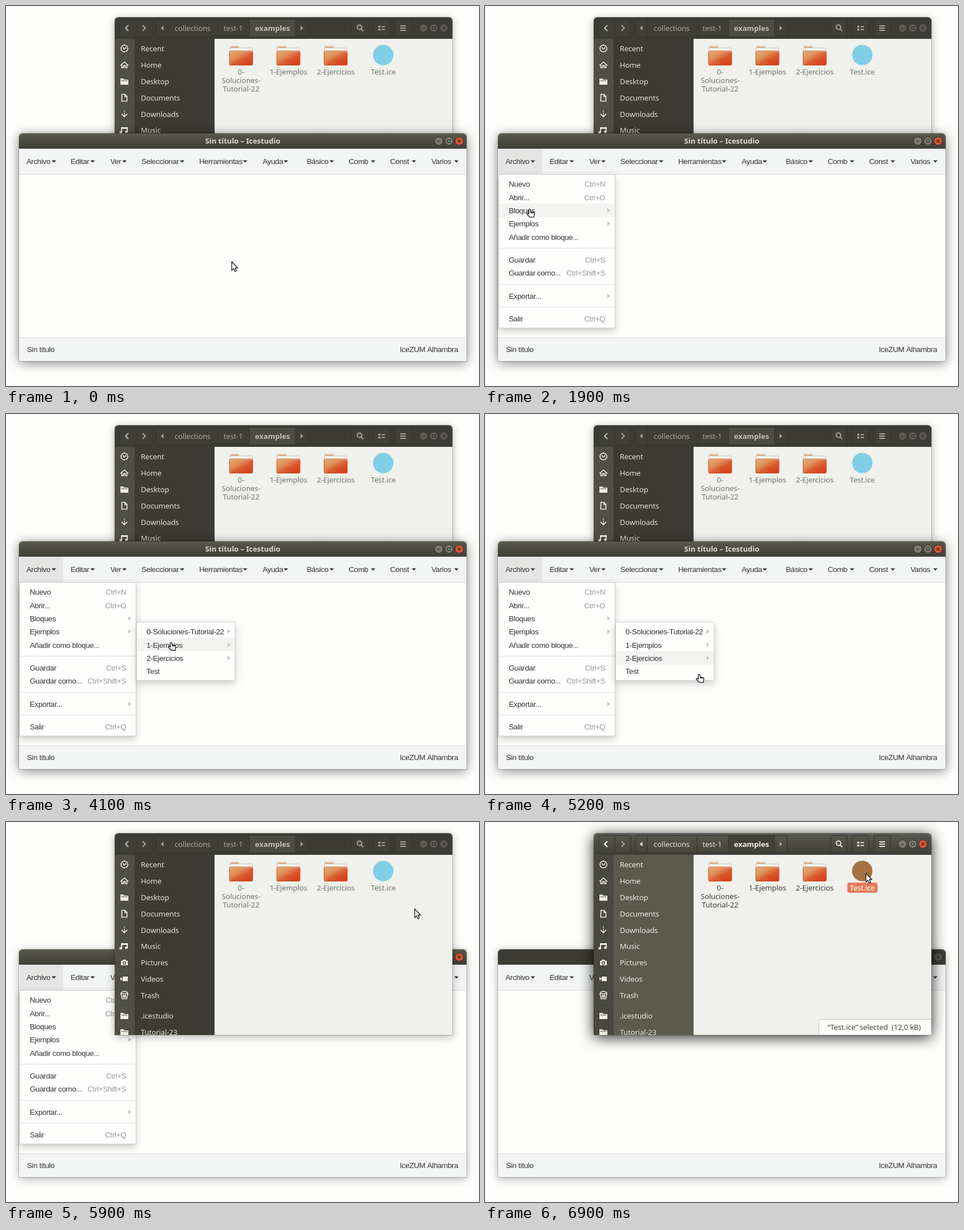
These frames come from a looping animation (835 by 671 pixels, 8 s). An HTML page with a canvas:

```html
<!DOCTYPE html>
<html lang="es">
<head>
<meta charset="utf-8">
<style>
html, body { margin: 0; width: 100%; height: 100%; overflow: hidden; background: #fefefc; }
canvas { display: block; }
</style>
</head>
<body>
<canvas id="stage" width="835" height="671"></canvas>
<script>
const ctx = document.getElementById('stage').getContext('2d');
const LOOP = 8000, STEP = 100;
const AT = { menu: 1200, sub: 2300, leave: 5300, subClosed: 5400, raise: 5900, focus: 6000, menuClosed: 6300, select: 6600 };

// Pointer stops: time, left, top
const track = [
  [0, 398, 451], [300, 398, 451], [1100, 56, 270], [1200, 54, 277], [1500, 54, 277],
  [1900, 73, 358], [2100, 83, 384], [2500, 83, 384], [2600, 93, 384], [2800, 93, 384],
  [2900, 95, 384], [3000, 95, 384], [3100, 113, 384], [3500, 113, 384], [4000, 270, 392],
  [4400, 369, 459], [4500, 372, 459], [5200, 372, 459], [5600, 721, 175], [5700, 721, 175],
  [5800, 721, 153], [6200, 721, 153], [6300, 684, 106], [6400, 684, 106], [6900, 672, 90], [LOOP, 672, 90]
];

const UI = '"Noto Sans", sans-serif', WEB = '"Liberation Sans", Arial, sans-serif';
const fonts = {
  ui: ['13px ' + UI, '-0.1px'],
  bold: ['bold 13px ' + UI, '0px'],
  web: ['13.5px ' + WEB, '-0.4px']
};

function text(str, x, y, color, font = 'ui', align = 'left') {
  [ctx.font, ctx.letterSpacing] = fonts[font];
  ctx.textAlign = align;
  ctx.fillStyle = color;
  ctx.fillText(str, x, y + 5);
}

function box(x, y, w, h, fill, radius = 0, stroke) {
  ctx.beginPath();
  ctx.roundRect(x, y, w, h, radius);
  if (fill) { ctx.fillStyle = fill; ctx.fill(); }
  if (stroke) { ctx.strokeStyle = stroke; ctx.lineWidth = 1; ctx.stroke(); }
}

function disc(x, y, r, fill, stroke) {
  ctx.beginPath();
  ctx.arc(x, y, r, 0, 7);
  ctx.fillStyle = fill;
  ctx.fill();
  if (stroke) { ctx.strokeStyle = stroke; ctx.lineWidth = 1; ctx.stroke(); }
}

function shape(d, x, y, fill, stroke, width = 1.6) {
  const path = new Path2D(d);
  ctx.save();
  ctx.translate(x, y);
  if (fill) { ctx.fillStyle = fill; ctx.fill(path, 'evenodd'); }
  if (stroke) { ctx.strokeStyle = stroke; ctx.lineWidth = width; ctx.stroke(path); }
  ctx.restore();
}

function gradient(x0, y0, x1, y1, ...colors) {
  const g = ctx.createLinearGradient(x0, y0, x1, y1);
  colors.forEach((c, i) => g.addColorStop(i / (colors.length - 1), c));
  return g;
}

function shadowed(alpha, blur, dy, draw) {
  ctx.save();
  ctx.shadowColor = `rgba(0,0,0,${alpha})`;
  ctx.shadowBlur = blur;
  ctx.shadowOffsetY = dy;
  draw();
  ctx.restore();
}

function windowBase(x, y, w, h, fill, alpha, blur, dy) {
  shadowed(alpha, blur, dy, () => box(x, y, w, h, fill, [6, 6, 0, 0]));
  box(x - .5, y - .5, w + 1, h + 1, null, [6, 6, 0, 0], 'rgba(0,0,0,.2)');
}

function titleBar(x, y, w, h, active) {
  box(x, y, w, h, active ? gradient(0, y, 0, y + h, '#5a594e', '#3e3d37') : '#3c3b35', [6, 6, 0, 0]);
}

function windowButtons(x, y, active) {
  const marks = ['M-3 .5H3', 'M-2.5-2.5h5v5h-5z', 'M-2.5-2.5l5 5M2.5-2.5l-5 5'];
  marks.forEach((mark, i) => {
    const close = active && i === 2;
    disc(x + 18 * i, y, 7.3, close ? '#e0572d' : active ? '#7d7c72' : '#5b5a53', '#302f2b');
    shape(mark, x + 18 * i, y, null, close ? '#4a1c0e' : '#34332e', 1.2);
  });
}

const topMenus = [
  ['Archivo', 36, 84.5], ['Editar', 114, 153], ['Ver', 184, 209], ['Seleccionar', 239, 311],
  ['Herramientas', 341, 422], ['Ayuda', 453, 494], ['Básico', 531, 575], ['Comb', 605, 648],
  ['Const', 678, 720], ['Varios', 751, 795]
];

const SUB = '>';
const fileMenu = [
  ['Nuevo', 314, 'Ctrl+N'], ['Abrir...', 337.5, 'Ctrl+O'], ['Bloques', 361, SUB], ['Ejemplos', 384, SUB],
  ['Añadir como bloque...', 407.5, ''], ['Guardar', 448, 'Ctrl+S'], ['Guardar como...', 471, 'Ctrl+Shift+S'],
  ['Exportar...', 512, SUB], ['Salir', 552, 'Ctrl+Q']
];
const examples = [
  ['0-Soluciones-Tutorial-22', 384, SUB], ['1-Ejemplos', 407.5, SUB], ['2-Ejercicios', 431, SUB], ['Test', 454, '']
];

function menu(items, x, y, w, h, hoverY) {
  shadowed(.2, 12, 5, () => box(x, y, w, h, '#fefefd'));
  box(x + .5, y + .5, w - 1, h - 1, null, 0, '#cfcfcc');
  for (const [label, cy, extra] of items) {
    if (Math.abs(hoverY - cy) <= 11.8) box(x + 1, cy - 12, w - 2, 23.5, '#f3f4f2');
    text(label, x + 18, cy, '#333', 'web');
    if (extra === SUB) shape('M0-4L5 0L0 4z', x + w - 14, cy, '#c8c8c6');
    else text(extra, x + w - 18, cy, '#999', 'web', 'right');
  }
}

function editor(t, pointer) {
  const active = t < AT.focus;
  const open = t >= AT.menu && t < AT.menuClosed;
  windowBase(23, 225, 790, 402, '#fefffc', ...(t < AT.raise ? [.5, 20, 3] : [.3, 15, 3]));
  titleBar(23, 225, 790, 27, active);
  text('Sin título – Icestudio', 418, 238, '#dfdbd2', 'bold', 'center');
  windowButtons(764, 238.5, active);

  box(23, 252, 790, 45, '#f3f5f4');
  if (open) box(24, 252, 77, 45, '#e5e6e4');
  box(23, 297, 790, 1, '#d9dbd9');
  for (const [label, x, caret] of topMenus) {
    text(label, x, 274, '#333', 'web');
    shape('M-4-1.5h8l-4 4z', caret, 274, '#333');
  }
  box(23, 585, 790, 42, '#f3f5f4');
  box(23, 585, 790, 1, '#d9dbd9');
  text('Sin título', 37, 606, '#333', 'web');
  text('IceZUM Alhambra', 798, 606, '#333', 'web', 'right');

  const hovering = t < AT.leave;
  const inSub = pointer.x > 224;
  if (open) {
    menu(fileMenu, 24, 297, 206, 272, hovering && !inSub ? pointer.y + 1 : 0);
    for (const y of [427, 491, 531]) box(25, y, 204, 1, '#e2e3e1');
  }
  if (t >= AT.sub && t < AT.subClosed)
    menu(examples, 230, 367, 175, 104, hovering && inSub ? Math.min(pointer.y + 1, 431) : 0);
}

const FOLDER = 'M-7-5h5l2 2h7v9H-7zM-5.5-1.5v1h11v-1z';
const places = [
  ['Recent', 75, null, 'M6 0A6 6 0 1 1-6 0A6 6 0 1 1 6 0M-3-2L0 1L3-2'],
  ['Home', 104, null, 'M-7 1L0-5L7 1M-4.5 0v5h3V1h3v4h3V0'],
  ['Desktop', 133, FOLDER],
  ['Documents', 162, null, 'M-4.5-6H1L4.5-2.5V6h-9zM1-6v4h3.5'],
  ['Downloads', 190.5, null, 'M0-6v2M0-2v2M0 1v4M-5 0L0 5L5 0'],
  ['Music', 219, 'M-6-5H6V3A2.5 2 0 1 1 4 1V-2H-4V4A2.5 2 0 1 1-6 2z'],
  ['Pictures', 248, 'M-6-3h3l1-2h4l1 2h3v8H-6zM3 1A3 3 0 1 0-3 1A3 3 0 1 0 3 1M1.5 1A1.5 1.5 0 1 1-1.5 1A1.5 1.5 0 1 1 1.5 1'],
  ['Videos', 277, 'M-3-4H6V4H-3zM-7-3L-3 0L-7 3z'],
  ['Trash', 306, null, 'M-6-3Q-5-7 0-7T6-3zM-6-3L-4 6H4L6-3M-2-1v5M0-1v5M2-1v5'],
  ['.icestudio', 342, FOLDER],
  ['Tutorial-23', 371, FOLDER]
];

function folder(cx) {
  box(cx - 20, 70.5, 17, 10, '#e2c4ac', 2);
  box(cx - 20, 73.5, 40, 9, '#dcc0aa', 2);
  box(cx - 19, 74.5, 38, 6, '#f7f5f1', 1);
  box(cx - 18, 72, 13, 1.5, '#d9a27f');
  box(cx - 20.5, 79.5, 41, 25, gradient(cx - 12, 78, cx + 4, 106, '#dba768', '#e0935a', '#db5a2c', '#d5431c'), 2, '#c9552a');
  box(cx - 20, 80, 40, 1, 'rgba(255,230,200,.55)');
}

function toolbar(active) {
  const ink = active ? '#e6e2d9' : '#a6a59d';
  const edge = active ? '#35342f' : '#33322d';
  const fill = active ? gradient(0, 23, 0, 55, '#56554b', '#454439') : '#3f3e38';
  titleBar(192, 20, 596, 38, active);
  box(200.5, 23.5, 57, 31, fill, 4, edge);
  box(265.5, 23.5, 268, 31, fill, 4, edge);
  box(429, 24, 82, 30, active ? '#403f38' : '#4b4a43');
  for (const x of [229, 286, 374, 429, 511]) box(x, 24, 1, 30, edge);
  for (const x of [610, 648, 686]) box(x + .5, 23.5, 29, 31, fill, 4, edge);

  shape('M3-5L-2 0L3 5', 213, 39, null, active ? '#fff' : '#c5c4bd', 2);
  shape('M-3-5L2 0L-3 5', 244, 39, null, '#a6a59d', 2);
  shape('M3-4L-2 0L3 4z', 275, 39, ink);
  shape('M-2-4L3 0L-2 4z', 522, 39, '#a6a59d');
  text('collections', 329.5, 39, ink, 'ui', 'center');
  text('test-1', 401, 39, ink, 'ui', 'center');
  text('examples', 470.5, 39, active ? '#f4f1ea' : '#c0bfb7', 'bold', 'center');
  shape('M3-1A4 4 0 1 1-5-1A4 4 0 1 1 3-1M2 2L6 6', 625, 38.5, null, ink, 2);
  shape('M-6-4h4v3h-4zM-6 1h4v3h-4zM0-3.5h6v2H0zM0 1.5h6v2H0z', 663, 39, ink);
  shape('M-5-4H5M-5 0H5M-5 4H5', 701, 39, null, ink, 2);
  windowButtons(737, 39, active);
}

function files(t) {
  const active = t >= AT.focus;
  const selected = t >= AT.select;
  windowBase(192, 20, 596, 356, '#f0f0ec', ...(active ? [.85, 26, 4] : [.3, 15, 3]));
  toolbar(active);

  ctx.save();
  ctx.beginPath();
  ctx.rect(192, 58, 596, 318);
  ctx.clip();
  box(192, 58, 176, 318, active ? '#5b5a4c' : '#3c3b34');
  box(192, 58, 35, 318, active ? '#484740' : '#504f47');
  box(368, 58, 1, 318, '#c9c9c3');
  for (const [label, y, solid, line] of places) {
    shape(solid || line, 209, y, solid && '#f0eee6', line && '#f0eee6');
    text(label, 238, y, active ? '#eeece5' : '#e2e0d8');
  }

  const ink = active ? '#3b3b38' : '#73736e';
  [415, 498.5, 582].forEach(folder);
  ['0-', 'Soluciones-', 'Tutorial-22'].forEach((line, i) => text(line, 415, 116 + 15.2 * i, ink, 'ui', 'center'));
  text('1-Ejemplos', 498.5, 116, ink, 'ui', 'center');
  text('2-Ejercicios', 582, 116, ink, 'ui', 'center');
  disc(666, 86.5, 18, selected ? '#a4713f' : t >= AT.menuClosed ? '#98def2' : '#7fcfe8');
  if (selected) {
    box(639.5, 107, 53.5, 18, '#e37d5a', 4);
    box(589.5, 348.5, 200, 30, '#fdfdfb', [4, 0, 0, 0], '#c6c6bf');
    text('“Test.ice” selected  (12,0 kB)', 687, 362, '#44443f', 'ui', 'center');
  }
  text('Test.ice', 666, 116, selected ? '#fff' : ink, 'ui', 'center');
  ctx.restore();
}

function pointerAt(t) {
  const i = Math.max(1, track.findIndex(stop => stop[0] >= t));
  const [t0, x0, y0] = track[i - 1], [t1, x1, y1] = track[i];
  const p = (t - t0) / (t1 - t0);
  const k = t1 - t0 > 300 ? p * p * (3 - 2 * p) : p;
  return { x: x0 + (x1 - x0) * k, y: y0 + (y1 - y0) * k };
}

const ARROW = 'M.5.5V16L4 12.7L6.3 18L8.7 17L6.5 11.5H11z';
const HAND = 'M4.5 8V2Q6-.7 7.5 2V5.5L12.5 6.5Q14.8 7 14.3 9.5L13.2 14.8H6L1.2 9.8Q.5 7.5 3 8L4.5 9.5zM8.5 6v2.5M11 6.5v2';

function cursor(t, { x, y }) {
  ctx.lineJoin = 'round';
  const hand = t >= AT.menu && t < AT.leave;
  shape(hand ? HAND : ARROW, x, y, '#fff', '#1c1c1c', 1.3);
  ctx.lineJoin = 'miter';
}

function render(now) {
  const t = Math.floor(now % LOOP / STEP) * STEP;
  const pointer = pointerAt(t);
  ctx.fillStyle = '#fefefc';
  ctx.fillRect(0, 0, 835, 671);
  if (t < AT.raise) {
    files(t);
    editor(t, pointer);
  } else {
    editor(t, pointer);
    files(t);
  }
  cursor(t, pointer);
}

let start;
function tick(now) {
  start ??= now;
  render(now - start);
  requestAnimationFrame(tick);
}
render(0);
requestAnimationFrame(tick);
</script>
</body>
</html>
```
